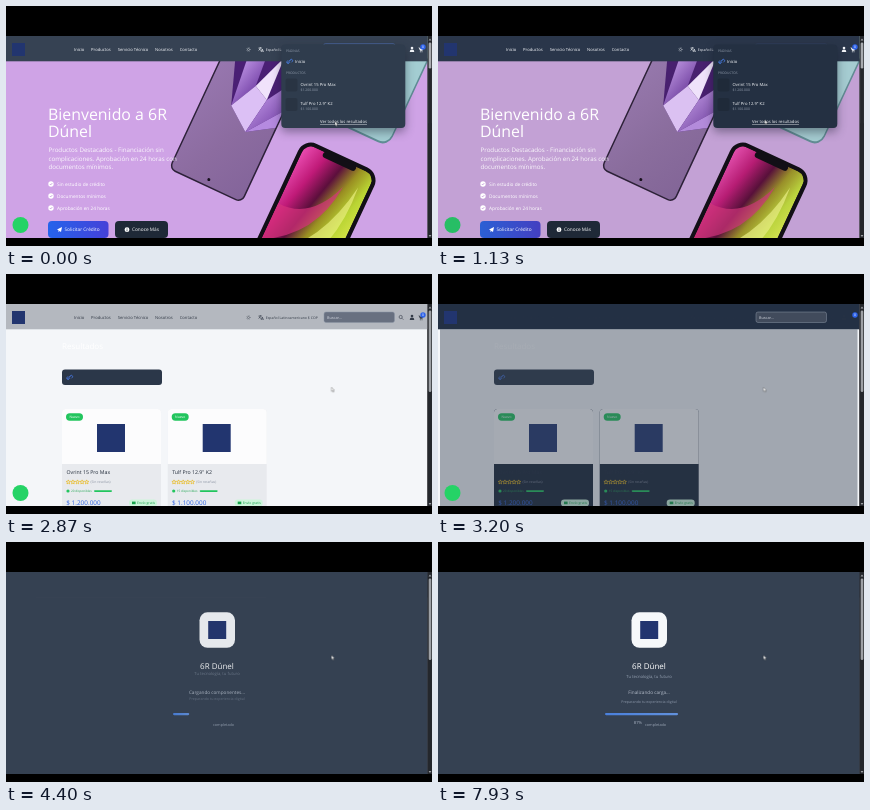
Recreate the animation shown at these times as an HTML page. Size 426 px wide and 240 px high, loop 8 s.

```html
<!DOCTYPE html>
<html lang="es">
<head>
<meta charset="utf-8">
<title>6R Dúnel</title>
<style>
  @property --pct { syntax: '<integer>'; inherits: true; initial-value: 0; }
  html, body { margin: 0; width: 100%; height: 100%; overflow: hidden; background: #000; }
  svg { display: block; width: 100vw; height: 100vh; font-family: "Open Sans", "Noto Sans", sans-serif; text-rendering: geometricPrecision; }
  .loop, .loop * { animation: 8s linear infinite; }
  .mid { text-anchor: middle; }
  .s3 { font-size: 3.4px; }
  .s4 { font-size: 4.2px; }
  .s5 { font-size: 4.75px; }
  .line { fill: none; stroke: currentColor; stroke-width: .6; }

  .loop .bar { animation-name: bar; }
  .loop .nav { animation-name: nav; }
  .loop .hero { animation-name: hero; }
  .loop .sky { animation-name: sky; }
  .loop .devices { animation-name: devices; }
  .loop .cta { animation-name: cta; }
  .loop .menu { animation-name: menu; }
  .loop .menu-bg { animation-name: menu-bg; filter: drop-shadow(0 4px 5px rgb(15 20 35 / .4)); }
  .loop .ring { animation-name: ring; }
  .loop .chat { animation-name: chat; }
  .loop .info { animation-name: info; }
  .loop .ink { animation-name: ink; }
  .loop .veil { animation-name: veil; }
  .loop .field { animation-name: field; }
  .loop .cursor { animation-name: cursor; }
  .loop .cover { animation-name: cover; }
  .loop .loader { animation-name: loader; }
  .loop .tagline, .loop .note { animation-name: late, drop; }
  .loop .fill { animation-name: fill; }
  .loop .percent { animation-name: count, percent; }
  .loop .status { opacity: 0; animation-timing-function: step-end; }
  .loop .st1 { animation-name: st1; }
  .loop .st2 { animation-name: st2; }
  .loop .st3 { animation-name: st3; }
  .loop .st4 { animation-name: st4; }
  .loop .st5 { animation-name: st5; }

  @keyframes bar {
    0% { fill: #364253 } 10% { fill: #2d3a4e } 26.6%, 29% { fill: #1f2a3c }
    35%, 36.5% { fill: #b4b8bf } 39.5%, 100% { fill: #233044 }
  }
  @keyframes nav {
    0%, 29% { color: #f4f6fa; opacity: 1 } 35%, 36.5% { color: #343c48; opacity: 1 }
    39.5%, 100% { color: #343c48; opacity: .15 }
  }
  @keyframes hero { 0%, 28.5% { opacity: 1 } 34%, 100% { opacity: 0 } }
  @keyframes sky { 0% { fill: #cfa3e6 } 11% { fill: #c99fdf } 26.6%, 100% { fill: #a9a9ad } }
  @keyframes devices { 0%, 11% { filter: grayscale(0) } 26.6%, 100% { filter: grayscale(.35) } }
  @keyframes cta { 0%, 11% { filter: grayscale(0) } 26.6%, 100% { filter: grayscale(.6) brightness(.85) } }
  @keyframes menu { 0%, 28.5% { opacity: 1 } 32.5%, 100% { opacity: 0 } }
  @keyframes menu-bg { 0% { fill: #2f3c4d } 10% { fill: #202c3d } 26.6%, 100% { fill: #303d50 } }
  @keyframes ring { 0% { opacity: .8 } 9%, 100% { opacity: .15 } }
  @keyframes chat { 0%, 11% { fill: #25d366 } 26.6%, 28.5% { fill: #2f6d63 } 34%, 100% { fill: #25d366 } }
  @keyframes info { 0%, 36.5% { fill: #e8eaee } 39.5%, 100% { fill: #1a2537 } }
  @keyframes ink { 0%, 36.5% { fill: #1f2937 } 39.5%, 100% { fill: #202b3d } }
  @keyframes field { 0%, 36.5% { fill: #687080 } 39.5%, 100% { fill: #414b5c } }
  @keyframes veil {
    0%, 37% { opacity: 0 } 40% { opacity: .43 } 43.4% { opacity: .97 } 52%, 100% { opacity: 1 }
  }
  @keyframes cover { 0%, 41.5% { opacity: 0 } 43.8%, 100% { opacity: 1 } }
  @keyframes cursor {
    0% { transform: translate(329px, 115.5px) } 10% { transform: translate(327px, 114px) }
    30%, 100% { transform: translate(325.5px, 113.3px) }
  }
  @keyframes loader { 0%, 43.4% { opacity: 0 } 55% { opacity: .92 } 65%, 100% { opacity: 1 } }
  @keyframes late { 0%, 44% { opacity: 0 } 55% { opacity: .6 } 64%, 100% { opacity: 1 } }
  @keyframes percent { 0%, 55% { opacity: 0 } 63%, 100% { opacity: 1 } }
  @keyframes drop { 0%, 55% { transform: translateY(-3px) } 63%, 100% { transform: translateY(0) } }
  @keyframes fill { 0%, 42.4% { width: 0 } 100% { width: 74.2px } }
  @keyframes count {
    0% { --pct: 0 } 42.5% { --pct: 0; animation-timing-function: steps(30) } 100% { --pct: 90 }
  }
  @keyframes st1 { 0% { opacity: 1 } 55.5%, 100% { opacity: 0 } }
  @keyframes st2 { 0% { opacity: 0 } 55.5% { opacity: 1 } 68.5%, 100% { opacity: 0 } }
  @keyframes st3 { 0% { opacity: 0 } 68.5% { opacity: 1 } 81.5%, 100% { opacity: 0 } }
  @keyframes st4 { 0% { opacity: 0 } 81.5% { opacity: 1 } 94.5%, 100% { opacity: 0 } }
  @keyframes st5 { 0% { opacity: 0 } 94.5%, 100% { opacity: 1 } }

  .percent { margin: 0; font-size: 4.2px; line-height: 6px; color: #aab4c3; text-align: right; }
  .percent::after { counter-reset: pct var(--pct); content: counter(pct) "%"; }
</style>
</head>
<body>
<svg class="loop" viewBox="0 0 426 240" preserveAspectRatio="none">
  <defs>
    <clipPath id="page"><rect y="30" width="426" height="202"/></clipPath>
    <clipPath id="screenA"><rect x="1.5" y="-170" width="78" height="168.500" rx="5.500"/></clipPath>
    <clipPath id="screenB"><rect x="4" y="4" width="76" height="160" rx="10"/></clipPath>
    <linearGradient id="lilac" x1="0" y1="0" x2="1" y2="1">
      <stop stop-color="#9b7ab4"/><stop offset=".6" stop-color="#8c6ca0"/><stop offset="1" stop-color="#83649a"/>
    </linearGradient>
    <linearGradient id="facet" x1="0" y1="0" x2="1" y2="1">
      <stop stop-color="#c9a0ee"/><stop offset="1" stop-color="#6d3aa0"/>
    </linearGradient>
    <linearGradient id="neon" x1="0" y1="0" x2="1" y2=".55">
      <stop stop-color="#ec4fb4"/><stop offset=".25" stop-color="#c01a78"/><stop offset=".45" stop-color="#5c0f3c"/>
      <stop offset=".62" stop-color="#9a8f22"/><stop offset=".8" stop-color="#b9d433"/><stop offset="1" stop-color="#d9e64a"/>
    </linearGradient>
    <linearGradient id="blue"><stop stop-color="#2563eb"/><stop offset="1" stop-color="#4540d8"/></linearGradient>
    <linearGradient id="progress"><stop stop-color="#4a80dc"/><stop offset="1" stop-color="#6291dc"/></linearGradient>
    <path id="star" d="M0-2.1 .6-.7 2.1-.6 1 .4 1.3 1.9 0 1.1-1.3 1.9-1 .4-2.1-.6-.6-.7z"/>
    <g id="check">
      <circle r="2.700" fill="#fff"/><path d="M-1.2 0-.3.9 1.3-.9" fill="none" stroke="#b98bd2" stroke-width=".7"/>
    </g>
    <g id="card">
      <path d="M0 55V3.5Q0 0 3.5 0h92Q99 0 99 3.5V55z" fill="#fcfcfd"/>
      <rect x="35" y="15" width="28" height="28" fill="#22356f"/>
      <rect x="4" y="4.300" width="17" height="7.400" rx="3.700" fill="#22c55e"/>
      <text x="12.500" y="9.300" class="mid s3" fill="#fff">Nuevo</text>
      <g fill="none" stroke="#e9b91d" stroke-width=".7">
        <use href="#star" x="6.300" y="73"/><use href="#star" x="10.900" y="73"/><use href="#star" x="15.500" y="73"/>
        <use href="#star" x="20.100" y="73"/><use href="#star" x="24.700" y="73"/>
      </g>
      <text x="28.500" y="74.300" class="s3" fill="#8a93a2">(Sin reseñas)</text>
      <circle cx="6" cy="82" r="1.600" fill="#22c55e"/>
      <rect x="32" y="81.300" width="18" height="1.600" rx=".8" fill="#22c55e"/>
      <rect x="67" y="90.500" width="28" height="7" rx="3.300" fill="#cdf5da"/>
      <rect x="70" y="92.600" width="3.600" height="2.600" fill="#16a34a"/>
      <text x="75" y="95.300" class="s3" fill="#16a34a">Envío gratis</text>
    </g>
  </defs>

  <rect width="426" height="240"/>
  <g clip-path="url(#page)">
    <rect y="30" width="421.500" height="203" fill="#f4f6f9"/>

    <!-- search results -->
    <text x="56" y="75" font-size="8" fill="#fff">Resultados</text>
    <rect x="56" y="95.500" width="100" height="15.500" rx="3" fill="#2b3749"/>
    <path d="M61.500 105l3-3m-2.500.4-.8.9a1.200 1.200 0 0 0 1.800 1.800l.8-.8m-.2-1.800.8-.8a1.200 1.200 0 0 1 1.800 1.800l-.8.8" fill="none" stroke="#4a7df0" stroke-width=".8"/>
    <g transform="translate(56 135)">
      <rect class="info" width="99" height="110" rx="3.500"/>
      <use href="#card"/>
      <text class="ink" x="4.500" y="65.300" font-size="5.200">Ovrint 15 Pro Max</text>
      <text x="9" y="83.200" font-size="3.100" fill="#22a653">20 disponibles</text>
      <text x="4.300" y="96.300" font-size="6.400" fill="#2f63e0">$ 1.200.000</text>
    </g>
    <g transform="translate(161.700 135)">
      <rect class="info" width="99" height="110" rx="3.500"/>
      <use href="#card"/>
      <text class="ink" x="4.500" y="65.300" font-size="5.200">Tulf Pro 12.9" K2</text>
      <text x="9" y="83.200" font-size="3.100" fill="#22a653">15 disponibles</text>
      <text x="4.300" y="96.300" font-size="6.400" fill="#2f63e0">$ 1.100.000</text>
    </g>

    <!-- landing section -->
    <g class="hero">
      <rect class="sky" y="55" width="421.500" height="178"/>
      <g class="devices">
        <g transform="translate(382 141) rotate(25)">
          <rect x="-92" y="-130" width="92" height="130" rx="11" fill="#5f8c94"/>
          <rect x="-90.500" y="-130" width="89" height="128" rx="10" fill="#a3cdd2"/>
        </g>
        <g transform="translate(162.500 163) rotate(25)">
          <rect y="-172" width="81" height="172" rx="7" fill="#2d2139"/>
          <g clip-path="url(#screenA)">
            <rect y="-172" width="82" height="172" fill="url(#lilac)"/>
            <path d="M14-128 30-84 54-66 82-84V-172H30z" fill="#4a1f74"/>
            <path d="M24-140 30-84 44-112 40-160z" fill="url(#facet)"/>
            <path d="M30-84 44-112 60-104 54-66z" fill="#dcc0f5"/>
            <path d="M44-112 58-150 60-104z" fill="#f0e2fb"/>
            <path d="M60-104 82-140V-104L54-66z" fill="url(#facet)"/>
            <path d="M54-66 82-104V-84z" fill="#b58ae0"/>
          </g>
          <circle cx="41" cy="-7.500" r="1.500" fill="#17101e"/>
        </g>
        <g transform="translate(298 132) rotate(25)">
          <rect width="84" height="180" rx="14" fill="#120f16"/>
          <g clip-path="url(#screenB)">
            <rect x="4" y="4" width="76" height="160" fill="url(#neon)"/>
            <path d="M4 70Q40 72 56 28 52 84 4 110z" fill="#d8327c" opacity=".7"/>
            <path d="M18 118Q60 88 70 22 76 90 40 130z" fill="#e9ee7c" opacity=".7"/>
          </g>
          <rect x="24" y="3" width="36" height="6.500" rx="3.200" fill="#120f16"/>
        </g>
      </g>
      <g fill="#fff">
        <g font-size="15.900"><text x="42" y="113.500">Bienvenido a 6R</text><text x="42" y="130.500">Dúnel</text></g>
        <g font-size="6.200" opacity=".92">
          <text x="42.500" y="145.500">Productos Destacados - Financiación sin</text>
          <text x="42.500" y="154.500">complicaciones. Aprobación en 24 horas con</text>
          <text x="42.500" y="163.300">documentos mínimos.</text>
        </g>
        <use href="#check" x="45" y="178"/><use href="#check" x="45" y="190"/><use href="#check" x="45" y="202"/>
        <g class="s5">
          <text x="51" y="179.700">Sin estudio de crédito</text>
          <text x="51" y="191.700">Documentos mínimos</text>
          <text x="51" y="203.700">Aprobación en 24 horas</text>
          <rect class="cta" x="42" y="215" width="60.500" height="17" rx="4" fill="url(#blue)"/>
          <path d="M51 223.500l5-2.500-1 5-1.500-1-1 1.300v-2z"/>
          <text x="58.500" y="225.400">Solicitar Crédito</text>
          <rect x="109" y="215" width="53" height="17" rx="4" fill="#1f2937"/>
          <circle cx="121" cy="223.700" r="2.400"/>
          <path d="M121 222v.6m0 .7v1.900" stroke="#1f2937" stroke-width=".7"/>
          <text x="126" y="225.400">Conoce Más</text>
        </g>
      </g>
    </g>

    <!-- header -->
    <rect class="bar" y="30" width="421.500" height="25.300"/>
    <rect x="6" y="37" width="13" height="13" fill="#22356f"/>
    <g class="nav" fill="currentColor">
      <g class="s4">
        <text x="68" y="45.200">Inicio</text><text x="85" y="45.200">Productos</text>
        <text x="111.700" y="45.200">Servicio Técnico</text><text x="149" y="45.200">Nosotros</text>
        <text x="173.700" y="45.200">Contacto</text>
      </g>
      <g opacity=".75">
        <circle class="line" cx="242.500" cy="43.500" r="1"/>
        <circle class="line" cx="242.500" cy="43.500" r="2" stroke-dasharray=".5 1.070"/>
      </g>
      <path class="line" d="M252.500 42h3.600m-1.800-1v1q-.3 1.800-1.800 2.500m.6-1.700q1 1.500 2 1.700m0 1.500 1.200-3 1.200 3m-2-1h1.600"/>
      <text x="259.700" y="45" font-size="3.500">Español Latinoamericano $ COP</text>
      <circle class="line" cx="394.700" cy="43" r="1.600"/><path class="line" d="M395.900 44.200l1.500 1.500"/>
      <circle cx="406" cy="42" r="1.300"/><path d="M403.700 46q0-2.400 2.300-2.400t2.300 2.400z"/>
      <path d="M412.500 41.500h1l.4 1h3.300l-.8 2.300h-2.300z"/><circle cx="414.300" cy="45.800" r=".5"/><circle cx="416" cy="45.800" r=".5"/>
    </g>
    <rect class="field" x="318" y="38" width="70.500" height="10.500" rx="2" stroke="#8b94a5" stroke-width=".5"/>
    <text x="321" y="45" font-size="3.800" fill="#d3d8e0">Buscar...</text>

    <!-- search suggestions -->
    <g class="menu">
      <rect class="bar" x="316" y="36.500" width="74" height="8"/>
      <rect class="ring" x="317.500" y="37.700" width="71.500" height="8" rx="2" fill="none" stroke="#5a83dd" stroke-width=".6"/>
      <rect class="menu-bg" x="275.300" y="38.500" width="124" height="83.500" rx="4"/>
      <g fill="#929dad" font-size="3.300">
        <text x="280" y="45.700">PÁGINAS</text><text x="280" y="67.500">PRODUCTOS</text>
        <text class="s3" x="294.500" y="85.200">$1.200.000</text><text class="s3" x="294.500" y="104">$1.100.000</text>
      </g>
      <path d="M281.500 57l3-3m-2.500.4-.8.9a1.200 1.200 0 0 0 1.800 1.800l.8-.8m-.2-1.800.8-.8a1.200 1.200 0 0 1 1.800 1.800l-.8.8" fill="none" stroke="#4c86f5" stroke-width=".8"/>
      <g opacity=".12">
        <rect x="279.500" y="72.500" width="12" height="13" rx="2"/><rect x="279.500" y="92" width="12" height="13" rx="2"/>
      </g>
      <g class="s4" fill="#f5f7fa">
        <text x="289" y="57.200">Inicio</text><text x="294.500" y="79.600">Ovrint 15 Pro Max</text>
        <text x="294.500" y="98.600">Tulf Pro 12.9" K2</text>
        <text x="337.500" y="117" class="mid" text-decoration="underline">Ver todos los resultados</text>
      </g>
    </g>

    <circle cx="417" cy="41" r="2.700" fill="#2f64ea"/>
    <text x="417" y="42.200" class="mid s3" fill="#fff">0</text>

    <!-- loading screen -->
    <rect class="veil" x="2" y="55.300" width="417.500" height="178" fill="#354152"/>
    <circle class="chat" cx="14.500" cy="219" r="8"/>
    <rect class="cover" y="30" width="421.500" height="25.300" fill="#354152"/>
    <path class="cover" d="M0 55h30v178H0zM260 55h161.500v178H260z" fill="#354152"/>
    <rect class="loader" y="30" width="421.500" height="203" fill="#354152"/>
    <g class="loader">
      <rect x="193.500" y="70.300" width="35.500" height="35.500" rx="8" fill="#f6f8fa"/>
      <rect x="202.200" y="79" width="18" height="18" fill="#22356f"/>
      <g class="mid">
        <text x="211" y="127.200" font-size="8" fill="#fff">6R Dúnel</text>
        <text class="tagline s4" x="211" y="135.800" fill="#97a3b4">Tu tecnología, tu futuro</text>
        <g font-size="4.700" fill="#b4bdca">
          <text class="status st1" x="211" y="151.500">Cargando componentes...</text>
          <text class="status st2" x="211" y="152.300">Conectando servicios...</text>
          <text class="status st3" x="211" y="152.300">Preparando interfaz...</text>
          <text class="status st4" x="211" y="152.300">Optimizando recursos...</text>
          <text class="status st5" x="211" y="152.300">Finalizando carga...</text>
        </g>
        <text class="note" x="211" y="160.700" font-size="3.600" fill="#8d99ab">Preparando tu experiencia digital</text>
      </g>
      <rect class="fill" x="167" y="171" width="0" height="2.200" rx="1.100" fill="url(#progress)"/>
      <foreignObject x="184" y="179" width="20" height="7"><p class="percent"></p></foreignObject>
      <text x="207" y="183.500" font-size="3.800" fill="#9aa5b5">completado</text>
    </g>

    <!-- scrollbar -->
    <rect x="421.500" y="30" width="5" height="203" fill="#24272c"/>
    <path d="M424 32.500l1.400 2h-2.800zM424 231l1.400-2h-2.800z" fill="#a0a3a8"/>
    <rect x="422.700" y="36.500" width="2.600" height="81.500" rx="1.300" fill="#9da0a5"/>
    <g class="hero">
      <rect x="422.200" y="36" width="3.600" height="83" fill="#24272c"/>
      <rect x="422.700" y="36.500" width="2.600" height="26" rx="1.300" fill="#a8abb0"/>
    </g>
  </g>
  <path class="cursor" d="M0 0v4.200l1-.9.700 1.500.7-.3-.7-1.500h1.300z" fill="#fff" stroke="#222" stroke-width=".3"/>
</svg>
</body>
</html>
```
